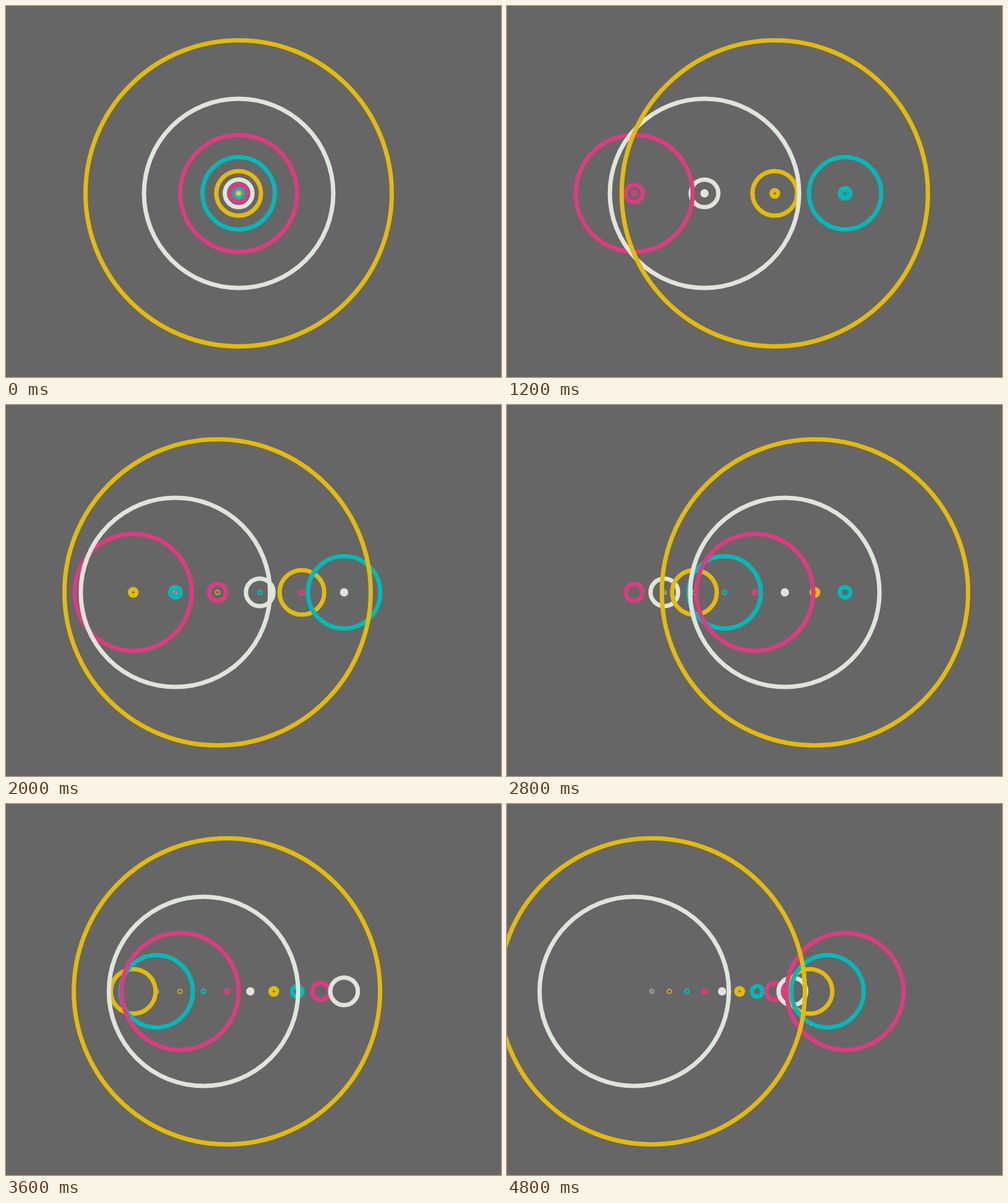
An HTML page with a canvas for the animation above (5.2 s loop, 800 by 600 pixels).

```html
<!DOCTYPE html>
<html lang="en">
<head>
<meta charset="utf-8">
<title>Fibonacci circles</title>
<style>
  html, body { margin: 0; width: 100%; height: 100%; overflow: hidden; background: #666; }
  canvas { display: block; }
</style>
</head>
<body>
<canvas id="stage" width="800" height="600"></canvas>
<script>
const ctx = document.getElementById("stage").getContext("2d");
const COLORS = ["#dfe5da", "#e3bb0a", "#00b9b9", "#de3b82"];
const CENTER_X = 376, CENTER_Y = 303, HALF_SPAN = 170.4;
const LINE = 7, STEP_MS = 400, STEPS = 13, SCALE = 247.5 / 610;

const fibonacci = [1, 2];
while (fibonacci.length < 14) fibonacci.push(fibonacci.at(-1) + fibonacci.at(-2));
const radii = fibonacci.map(n => n * SCALE);

// Circle i takes slot (i + 1) mod slots; the slots are spread evenly.
function slotX(i, slots) {
  if (slots === 1) return CENTER_X;
  return CENTER_X + HALF_SPAN * (2 * ((i + 1) % slots) / (slots - 1) - 1);
}

// A radius below half the line width turns the pen inside out, leaving a thin ring.
function drawRing(x, radius, color) {
  ctx.strokeStyle = color;
  ctx.lineWidth = Math.min(LINE, 2 * radius);
  ctx.beginPath();
  ctx.arc(x, CENTER_Y, Math.max(radius, LINE / 2), 0, 2 * Math.PI);
  ctx.stroke();
}

// The smallest ring has a bar across it.
function drawBar(x, color) {
  ctx.strokeStyle = color;
  ctx.lineWidth = 1;
  ctx.beginPath();
  ctx.moveTo(x - 2.3, CENTER_Y - 2.3);
  ctx.lineTo(x + 2.3, CENTER_Y + 2.3);
  ctx.stroke();
}

function draw(now) {
  const slots = Math.floor(now / STEP_MS) % STEPS + 1;
  ctx.fillStyle = "#666";
  ctx.fillRect(0, 0, 800, 600);
  drawBar(slotX(0, slots), COLORS[0]);
  radii.forEach((radius, i) => drawRing(slotX(i, slots), radius, COLORS[i % 4]));
}

let start;
function frame(now) {
  start ??= now;
  draw(now - start);
  requestAnimationFrame(frame);
}
draw(0);
requestAnimationFrame(frame);
</script>
</body>
</html>
```
